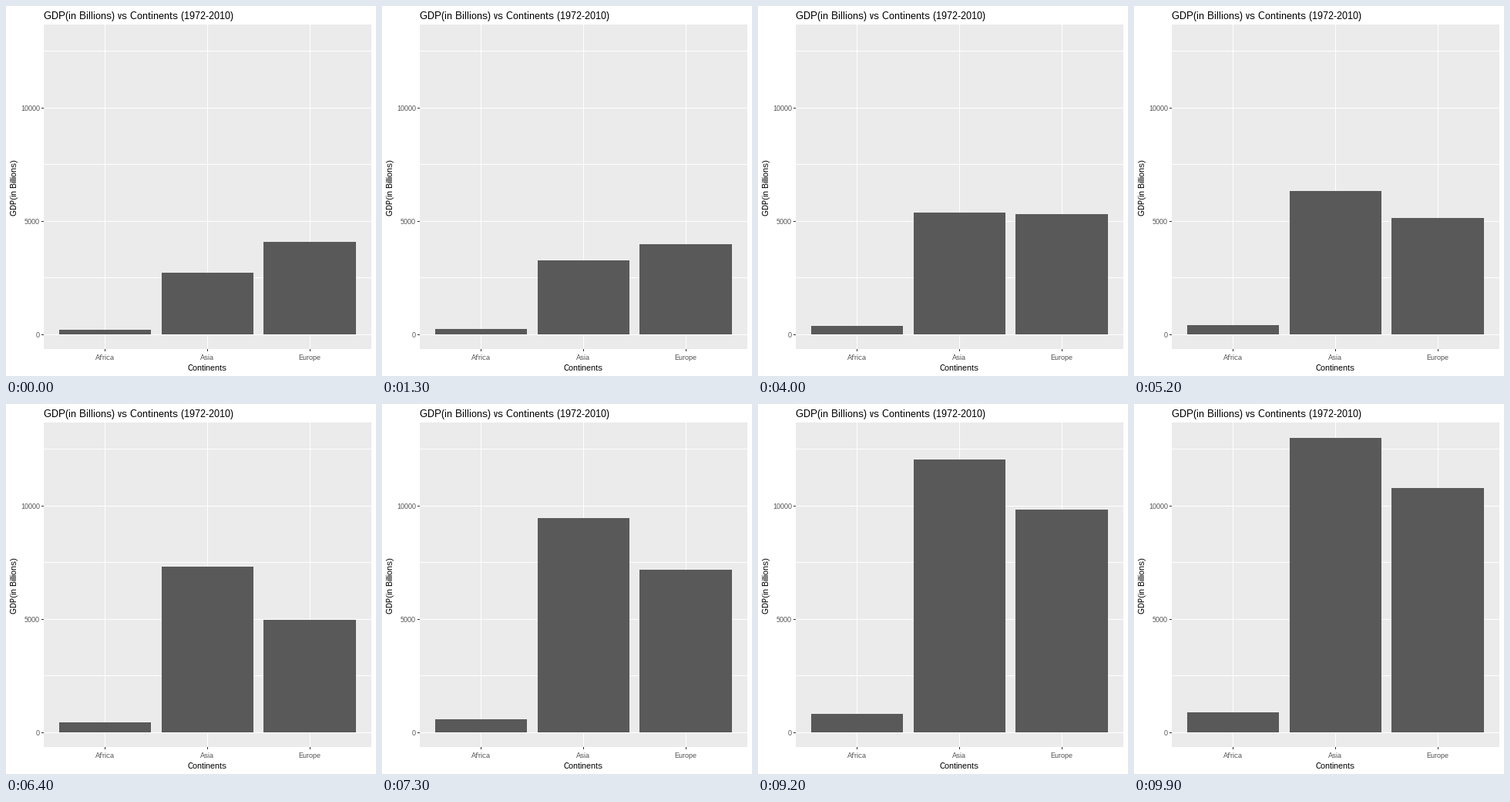
Recreate the animation shown at these times as a matplotlib script. Size 480 by 480 pixels, loop 10000 ms.

```python
import numpy as np
import matplotlib as mpl
import matplotlib.pyplot as plt
from matplotlib.animation import FuncAnimation
from matplotlib.patches import Rectangle

mpl.rcParams.update({
    "font.family": "Liberation Sans",
    "text.hinting": "native",
    "text.hinting_factor": 1,
})

SIZE, FRAMES, INTERVAL = 480, 100, 100
LEFT, TOP, RIGHT, BOTTOM = 49, 24, 474, 445
ZERO = 427
PX_PER_BILLION = 0.0294
INK, GREY, TICK = "#000000", "#4d4d4d", "#333333"

# name -> left edge, right edge, centre column
BARS = {
    "Africa": (69, 188, 128),
    "Asia": (202, 321, 261),
    "Europe": (334, 454, 394),
}

# Each period: first frame, last frame, (start, end) GDP per continent.
# The totals jump between periods, where new countries join the data.
PERIODS = [
    (0, 26, [(224, 293), (2738, 3827), (4105, 3912)]),
    (26, 65, [(344, 469), (4279, 7398), (5497, 4973)]),
    (65, 99, [(510, 898), (8388, 13014), (6099, 10803)]),
]

fig = plt.figure(figsize=(SIZE / 72, SIZE / 72), dpi=72, facecolor="white")
ax = fig.add_axes([0, 0, 1, 1])
ax.set(xlim=(0, SIZE), ylim=(SIZE, 0))
ax.axis("off")


def box(x0, y0, x1, y1, color):
    patch = Rectangle((x0, y0), x1 - x0, y1 - y0, facecolor=color,
                      linewidth=0, antialiased=False)
    return ax.add_patch(patch)


def label(x, y, text, size, color=INK, ha="center", **kw):
    ax.text(x, y, text, fontsize=size, color=color, ha=ha,
            va=kw.pop("va", "baseline"), **kw)


def gdp(frame):
    first, last, spans = [p for p in PERIODS if p[0] <= frame][-1]
    t = (frame - first) / (last - first)
    return [a + (b - a) * t for a, b in spans]


box(LEFT, TOP, RIGHT, BOTTOM, "#ebebeb")

for y in (58, 205, 352):
    box(LEFT, y, RIGHT, y + 1, "white")
for y, text in ((132, "10000"), (279, "5000"), (426, "0")):
    box(LEFT, y, RIGHT, y + 1, "white")
    box(LEFT - 3, y, LEFT, y + 1, TICK)
    label(44, y + 4, text, 9, GREY, ha="right")

for name, (_, _, x) in BARS.items():
    box(x, TOP, x + 1, BOTTOM, "white")
    box(x, BOTTOM, x + 1, BOTTOM + 3, TICK)
    label(x, 459, name, 9, GREY)

label(LEFT, 17, "GDP(in Billions) vs Continents (1972-2010)", 13, ha="left")
label(261, 473, "Continents", 11)
label(11.5, 235, "GDP(in Billions)", 11, rotation=90, va="center")

bars = [box(x0, ZERO, x1, ZERO, "#595959") for x0, x1, _ in BARS.values()]


def draw(frame):
    for bar, value in zip(bars, gdp(frame)):
        top = np.floor(ZERO - value * PX_PER_BILLION)
        bar.set_y(top)
        bar.set_height(ZERO - 1 - top)
    return bars


anim = FuncAnimation(fig, draw, frames=FRAMES, interval=INTERVAL,
                     repeat=True, repeat_delay=0, blit=False)
plt.show()
```
